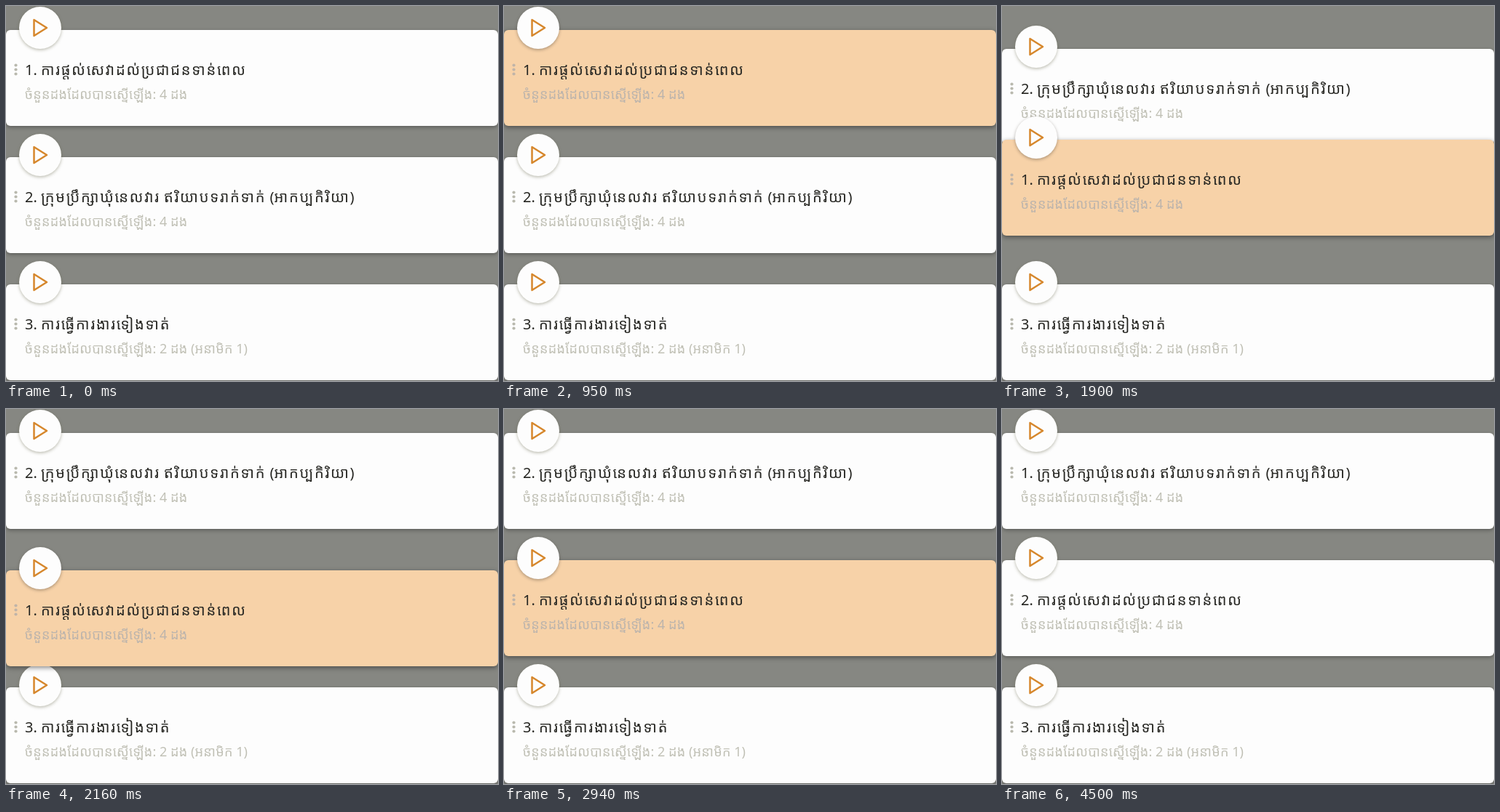
An HTML page with a canvas that plays this animation: 676x516 px, repeating every 4.59 s.

```html
<!DOCTYPE html>
<html lang="km">
<head>
<meta charset="utf-8">
<style>
  html, body { margin: 0; width: 100%; height: 100%; overflow: hidden; background: #868782; }
  canvas { display: block; }
</style>
</head>
<body>
<canvas id="stage" width="676" height="516"></canvas>
<script>
const ctx = document.getElementById('stage').getContext('2d');
const LOOP = 4590, GRAB = 950, DROP = 4330;
const SLOT = 175, TOP = 33, CARD_H = 132;
const FAMILY = '"Noto Sans", "Noto Sans Khmer", "Open Sans", sans-serif';
const COUNT = 'ចំនួនដងដែលបានស្នើឡើង: ';

const cards = {
  service: { title: 'ការផ្តល់សេវាដល់ប្រជាជនទាន់ពេល', sub: COUNT + '4 ដង' },
  council: { title: 'ក្រុមប្រឹក្សាឃុំនេលវារ ឥរិយាបទរាក់ទាក់ (អាកប្បកិរិយា)', sub: COUNT + '4 ដង' },
  work: { title: 'ការធ្វើការងារទៀងទាត់', sub: COUNT + '2 ដង (អនាមិក 1)' }
};

// Dragged distance over time: [ms, px]
const drag = [
  [1300, 0], [1380, 1], [1470, 5], [1560, 13], [1640, 36], [1730, 76], [1820, 116],
  [1900, 151], [1990, 174], [2080, 185], [2170, 190], [2250, 192], [2430, 191],
  [2510, 189], [2600, 185], [2680, 181], [2770, 178], [2850, 176], [2940, 175]
];

function follow(path, t) {
  if (t <= path[0][0]) return path[0][1];
  for (let i = 1; i < path.length; i++) {
    const [t0, v0] = path[i - 1], [t1, v1] = path[i];
    if (t < t1) return v0 + (v1 - v0) * (t - t0) / (t1 - t0);
  }
  return path[path.length - 1][1];
}

const easeOut = p => 1 - (1 - Math.min(1, Math.max(0, p))) ** 3;

// The motion advances in steps of about 86 ms
function stepTime(t) {
  if (t < 1380) return 0;
  const n = Math.floor((t - 1380 + 4) / 86.7);
  return 1380 + n * 86.7;
}

function shadow(color, blur, dy) {
  ctx.shadowColor = color;
  ctx.shadowBlur = blur;
  ctx.shadowOffsetY = dy;
}

// Only the Khmer runs are letter-spaced
function text(str, x, y, size, spacing, color) {
  ctx.font = size + 'px ' + FAMILY;
  ctx.fillStyle = color;
  for (const run of str.match(/[\u1780-\u17ff]+|[^\u1780-\u17ff]+/g)) {
    ctx.letterSpacing = (run[0] >= '\u1780' ? spacing : 0) + 'px';
    ctx.fillText(run, x, y);
    x += ctx.measureText(run).width;
  }
}

function drawCard(card, number, y, held) {
  ctx.save();
  ctx.translate(0, Math.round(y));

  ctx.save();
  shadow(held ? 'rgba(20,20,20,.5)' : 'rgba(30,30,30,.4)', held ? 6 : 5, 2);
  ctx.fillStyle = held ? '#f7d2a8' : '#fdfdfd';
  ctx.beginPath();
  ctx.roundRect(0, 0, 676, CARD_H, 6);
  ctx.fill();
  ctx.restore();

  ctx.save();
  shadow(held ? 'rgba(60,50,40,.4)' : 'rgba(90,90,60,.4)', 4, 1.5);
  ctx.fillStyle = '#fdfdfd';
  ctx.beginPath();
  ctx.arc(47, -3, 29, 0, 7);
  ctx.fill();
  ctx.restore();

  ctx.strokeStyle = '#d6872c';
  ctx.lineWidth = 2.5;
  ctx.lineJoin = 'round';
  ctx.beginPath();
  ctx.moveTo(38.5, -14);
  ctx.lineTo(56, -3);
  ctx.lineTo(38.5, 8);
  ctx.closePath();
  ctx.stroke();

  ctx.fillStyle = held ? '#c0b4a8' : '#b9b9ae';
  for (let i = 0; i < 3; i++) {
    ctx.beginPath();
    ctx.arc(13.5, 48.5 + i * 6, 2.1, 0, 7);
    ctx.fill();
  }

  text(number + '. ' + card.title, 26, 62, 20, 1.8, '#262622');
  text(card.sub, 26, 95, 18, 0.3, held ? '#bcb4ac' : '#c1c1b6');
  ctx.restore();
}

function draw(t) {
  const { service, council, work } = cards;
  ctx.fillStyle = '#868782';
  ctx.fillRect(0, 0, 676, 516);
  const slotY = i => TOP + i * SLOT;

  if (t >= DROP) {
    drawCard(council, 1, slotY(0), false);
    drawCard(service, 2, slotY(1), false);
    drawCard(work, 3, slotY(2), false);
    return;
  }
  const s = stepTime(t);
  const swap = easeOut((s - 1760) / 300);
  drawCard(council, 2, slotY(1 - swap), false);
  drawCard(work, 3, slotY(2), false);
  drawCard(service, 1, TOP + follow(drag, s), t >= GRAB);
}

function tick(now) {
  draw(now % LOOP);
  requestAnimationFrame(tick);
}
draw(0);
requestAnimationFrame(tick);
</script>
</body>
</html>
```
